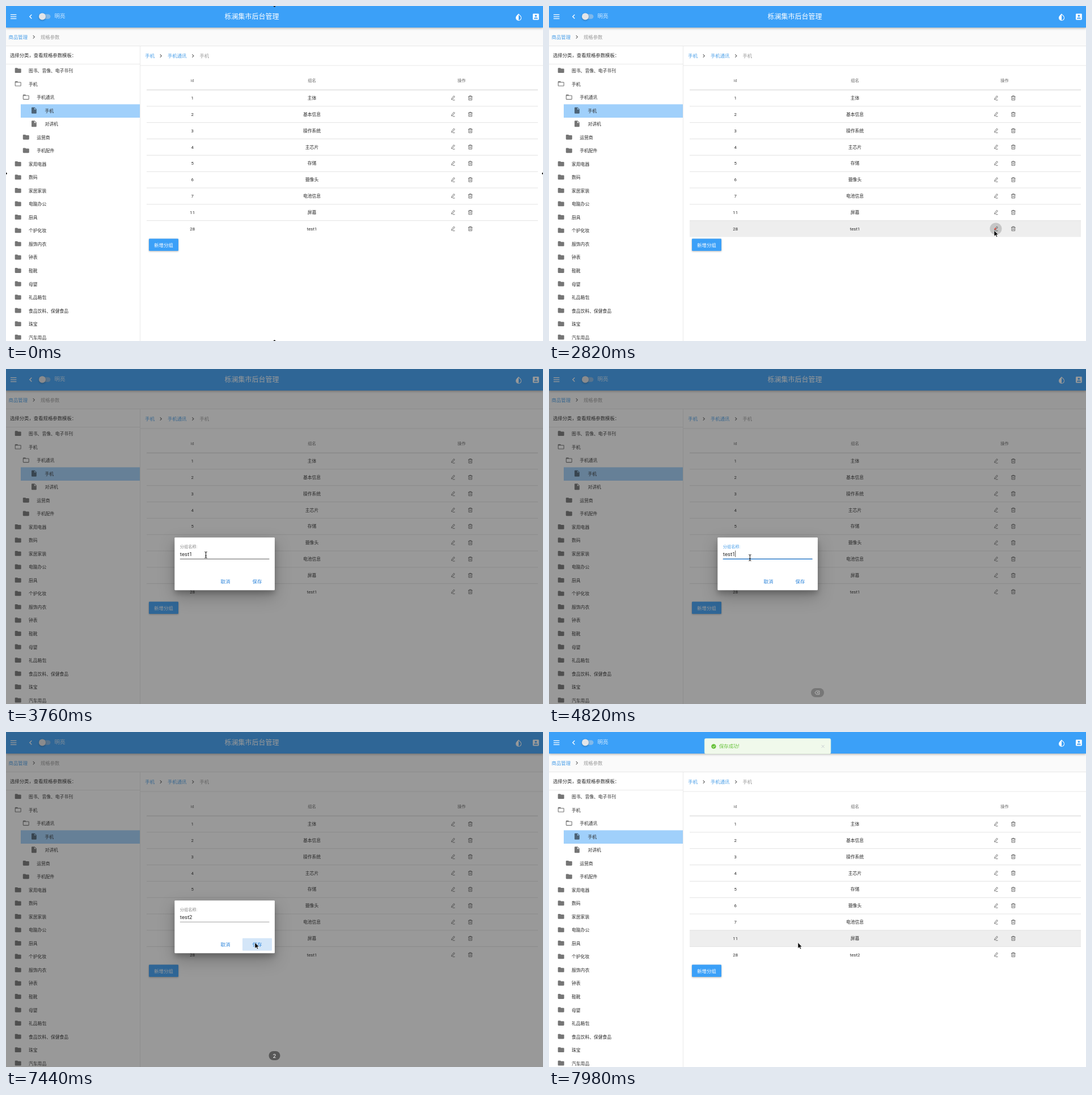
Recreate the animation shown at these times as an HTML page. Size 947 by 591 pixels, loop 8 s.

```html
<!DOCTYPE html>
<html lang="zh-CN">
<head>
<meta charset="utf-8">
<style>
html, body { margin: 0; width: 100%; height: 100%; overflow: hidden; background: #fff; }
svg { display: block; width: 100%; height: 100%; font-family: Roboto, 'Noto Sans CJK SC', 'Noto Sans CJK', sans-serif; }
.raised { filter: drop-shadow(0 1px 1.5px rgba(0,0,0,.3)); }
#panel { filter: drop-shadow(0 6px 5px rgba(0,0,0,.2)) drop-shadow(0 10px 14px rgba(0,0,0,.24)); }
</style>
</head>
<body>
<svg id="stage" viewBox="0 0 947 591"></svg>
<script>
const LOOP = 8000;
const BLUE = '#3ba0f8', LINK = '#4a9fe8', INK = '#2b2b2b', GREY = '#757575', ACTION = '#2a83da';
const ROW_H = 28.83, TABLE_TOP = 148;

// --- markup helpers; text is placed by its vertical centre ---
const text = (s, x, y, size = 7.8, fill = INK, extra = '') =>
  `<text x="${x}" y="${y + size * 0.37}" font-size="${size}" fill="${fill}" ${extra}>${s}</text>`;
const mid = (s, x, y, size, fill, extra = '') => text(s, x, y, size, fill, `text-anchor="middle" ${extra}`);
const rect = (x, y, w, h, fill, extra = '') =>
  `<rect x="${x}" y="${y}" width="${w}" height="${h}" fill="${fill}" ${extra}/>`;
const circle = (x, y, r, fill, extra = '') => `<circle cx="${x}" cy="${y}" r="${r}" fill="${fill}" ${extra}/>`;
const line = (d, stroke, width = 1, extra = '') =>
  `<path d="${d}" fill="none" stroke="${stroke}" stroke-width="${width}" ${extra}/>`;
const icon = (d, cx, cy, fill, scale = 0.55) =>
  `<path d="${d}" fill="${fill}" fill-rule="evenodd" transform="translate(${cx} ${cy}) scale(${scale}) translate(-12 -12)"/>`;
const chevron = (x, y) => line(`M${x - 1.3} ${y - 2.7}l2.7 2.7l-2.7 2.7`, '#666', 1.1);

const FOLDER = 'M10 4H4Q2 4 2 6V18Q2 20 4 20H20Q22 20 22 18V8Q22 6 20 6H12Z';
const ICONS = {
  folder: FOLDER,
  open: FOLDER + 'M4 8H20V18H4Z',
  file: 'M6 2Q4 2 4 4V20Q4 22 6 22H18Q20 22 20 20V8L14 2ZM13 9V3.5L18.5 9Z'
};

const tree = [
  [0, '图书、音像、电子书刊'], [0, '手机', 'open'], [1, '手机通讯', 'open'],
  [2, '手机', 'file'], [2, '对讲机', 'file'], [1, '运营商'], [1, '手机配件'],
  ...['家用电器', '数码', '家居家装', '电脑办公', '厨具', '个护化妆', '服饰内衣', '钟表', '鞋靴',
    '母婴', '礼品箱包', '食品饮料、保健食品', '珠宝', '汽车用品'].map(name => [0, name])
];
const groups = [[1, '主体'], [2, '基本信息'], [3, '操作系统'], [4, '主芯片'], [5, '存储'],
  [6, '摄像头'], [7, '电池信息'], [11, '屏幕'], [28, 'test1']];

const header = () => `<g>
  ${rect(0, 0, 947, 38, BLUE, 'style="filter:drop-shadow(0 1.5px 2px rgba(0,0,0,.35))"')}
  ${line('M8 15.3h10.4M8 18.8h10.4M8 22.3h10.4', '#fff', 1.2)}
  ${line('M45.3 15.3l-3.5 3.5l3.5 3.5', '#fff', 1.3)}
  ${rect(58.5, 14.4, 20, 8.4, '#82b9ea', 'rx="4.2"')}
  ${circle(64, 18.6, 6, '#e3e5e8', 'class="raised"')}
  ${text('明亮', 85.5, 18, 9.4, '#fff', 'opacity=".78"')}
  ${mid('栎澜集市后台管理', 433.5, 19, 12, '#fff', 'font-weight="500"')}
  ${line('M904 14.4l3.2 3.3a4.5 4.5 0 1 1-6.4 0z', '#fff', 1.1)}
  <path d="M904 14l-3.3 3.5a4.6 4.6 0 0 0 3.3 7.4z" fill="#fff"/>
  ${rect(929, 13.6, 10.8, 10.8, '#fff', 'rx="1.3"')}
  ${circle(934.4, 17.2, 1.8, BLUE)}
  <path d="M930.8 22.6q0-2.4 3.6-2.4t3.6 2.4z" fill="${BLUE}"/>
</g>`;

const treeItem = ([level, name, kind = 'folder'], i) => {
  const y = 114 + i * 23.52, selected = i === 3;
  return (selected ? rect(26, 173.4, 210, 23.6, '#a0d0fb') : '')
    + icon(ICONS[kind], 21.2 + level * 14.1, y - 0.3, selected ? '#4c6478' : GREY)
    + text(name, 40 + level * 14.2, y + 0.3);
};

const groupRow = ([id, name], i) => {
  const top = TABLE_TOP + i * ROW_H, y = top + 14.2;
  return rect(248, top, 690, ROW_H, '#eee', `id="row${id}" opacity="0"`)
    + (i ? line(`M248 ${top}H938`, '#dcdcdc', 0.8) : '')
    + mid(id, 328.7, y, 7.8) + mid(name, 539.5, y, 7.8, INK, `id="name${id}"`)
    + line(`M785.6 ${y + 3}l.5-2.3l3.6-4.4l1.6 1.3l-3.6 4.4zM787.6 ${y + 3.8}h4`, '#555', 0.8)
    + line(`M815 ${y - 2.4}h7.6M817.2 ${y - 2.4}v-1.3h3.2v1.3M816 ${y - 2.4}v6.2h5.6v-6.2M817.9 ${y - .5}v2.7M819.7 ${y - .5}v2.7`, '#555', 0.8);
};

const page = () => `
  ${rect(0, 0, 947, 591, '#fff')}
  ${rect(0, 38, 947, 32.5, '#fafafa')}
  ${line('M0 70.5H947M0 102.5H236M236.5 71V591M237 105H947', '#e4e4e4', 0.8)}
  ${header()}
  ${text('商品管理', 4.6, 54.4, 8.4, LINK)}${chevron(49, 54.6)}${text('规格参数', 61, 54.4, 8.4, '#9a9a9a')}
  ${text('选择分类，查看规格参数模板：', 7, 86.5, 8.4)}
  ${tree.map(treeItem).join('')}
  ${text('手机', 245.3, 87.8, 8.4, LINK)}${chevron(273, 88)}
  ${text('手机通讯', 285, 87.8, 8.4, LINK)}${chevron(329.6, 88)}
  ${text('手机', 341.5, 87.8, 8.4, '#9a9a9a')}
  ${mid('id', 328.7, 131, 7.2, '#666')}${mid('组名', 539.5, 131, 7.2, '#666')}${mid('操作', 803.5, 131, 7.2, '#666')}
  ${groups.map(groupRow).join('')}
  ${line('M248 148H938', '#d0d0d0', 1)}
  ${circle(788, 393, 10.6, '#000', 'id="hoverDisc" opacity="0"')}
  ${rect(252, 410.4, 52, 21.6, BLUE, 'rx="1.3" class="raised"')}
  ${mid('新增分组', 278, 421.4, 8.4, '#fff', 'font-weight="500"')}
  ${circle(0, 0, 0, '#f44336', 'id="click"')}`;

const dialog = () => `<g id="dialog">
  ${rect(297.3, 297.3, 176.6, 93, '#fff', 'rx="1.3" id="panel"')}
  ${text('分组名称:', 306.8, 313.3, 7.2, '#8a8a8a', 'id="label"')}
  ${text('test1', 306.8, 326.3, 9.6, INK, 'id="field"')}
  ${line('M306.8 335.2H464.4', '#444', 0.8, 'id="baseline"')}
  ${rect(306.8, 334.7, 157.6, 1.3, ACTION, 'id="focusLine"')}
  ${rect(328.4, 320.3, 0.8, 11.5, '#333', 'id="caret"')}
  ${rect(417, 363.8, 52, 22, ACTION, 'rx="1.3" id="saveTint"')}
  ${mid('取消', 387, 374.6, 8.4, ACTION, 'font-weight="500"')}
  ${mid('保存', 443, 374.6, 8.4, ACTION, 'font-weight="500"')}
</g>`;

const toast = () => `<g id="toast">
  ${rect(274.3, 11.5, 222.6, 27, '#f0f9eb', 'rx="2.4" stroke="#e1f3d8" stroke-width=".6"')}
  ${circle(290.4, 25.4, 4.2, '#67c23a')}
  ${line('M288.4 25.5l1.5 1.5l2.7-2.9', '#fff', 0.9)}
  ${text('保存成功!', 300, 25.3, 8.4, '#67c23a')}
  ${line('M480.6 22.9l5 5m0-5l-5 5', '#c0c4cc', 0.8)}
</g>`;

const keys = () => `
  <g id="keyBack">${rect(462, 563, 23, 16, '#575757', 'rx="8"')}
    ${line('M469 571l2.4-3h5.4v6h-5.4zM472.5 569.7l2.6 2.6m0-2.6l-2.6 2.6', '#fff', 0.8)}</g>
  <g id="keyTwo">${rect(463.5, 563, 20, 16, '#575757', 'rx="8"')}${mid('2', 473.5, 571, 9.6, '#fff')}</g>`;

const pointers = () => `
  <path id="arrow" d="M0 0V10.2L2.4 8L4 11.6L5.7 10.8L4.1 7.4H7.2Z" fill="#000" stroke="#fff" stroke-width=".6"/>
  ${line('M-2-5.5Q0-5.5 0-4Q0-5.5 2-5.5M0-4.5V4.5M-2 5.5Q0 5.5 0 4Q0 5.5 2 5.5M-1.2 1.6H1.2', '#111', 1, 'id="beam"')}`;

const handles = () => '<g id="handles">'
  + [[0, 295.5], [947, 295.5], [473.5, 0], [473.5, 591]].map(([x, y]) => circle(x, y, 1.8, '#111')).join('') + '</g>';

document.getElementById('stage').innerHTML = page()
  + rect(0, 0, 947, 591, '#212121', 'id="overlay"')
  + dialog() + toast() + keys() + pointers() + handles();

const el = {};
document.querySelectorAll('[id]').forEach(node => { el[node.id] = node; });

// --- timing helpers ---
const ramp = (t, start, length) => Math.min(1, Math.max(0, (t - start) / length));
const smooth = p => (1 - Math.cos(Math.PI * p)) / 2;
const bezier = (x1, y1, x2, y2) => x => {
  const at = (a, b, s) => 3 * a * s * (1 - s) ** 2 + 3 * b * s * s * (1 - s) + s ** 3;
  let low = 0, high = 1;
  for (let i = 0; i < 20; i++) {
    const s = (low + high) / 2;
    if (at(x1, x2, s) < x) low = s; else high = s;
  }
  return at(y1, y2, high);
};
const ease = bezier(0.25, 0.1, 0.25, 1);
const swift = bezier(0.25, 0.8, 0.25, 1);

const set = (node, attrs) => { for (const name in attrs) node.setAttribute(name, attrs[name]); };
const fade = (node, opacity) => node.setAttribute('opacity', opacity);
const show = (node, visible) => { node.style.display = visible ? '' : 'none'; };

// start, end, from, to
const moves = [
  [500, 1300, [513, 541], [780, 394.3]],
  [1340, 1400, [780, 394.3], [784.6, 394]],
  [2480, 2560, [784.6, 394], [785, 396]],
  [3300, 3740, [785, 396], [352.5, 328]],
  [3880, 4080, [352.5, 328], [354.4, 333]],
  [5980, 6780, [354.4, 333], [439, 371.5]]
];

function pointerAt(t) {
  const [start, end, from, to] = moves.filter(move => t >= move[0]).pop() || moves[0];
  const p = smooth(ramp(t, start, end - start));
  return from.map((v, i) => v + (to[i] - v) * p);
}

function drawPointer(t) {
  const [x, y] = pointerAt(t);
  const inField = t > 3300 && t < 7100 && x < 465 && y > 316 && y < 341;
  show(el.arrow, t >= 500 && !inField);
  show(el.beam, inField);
  set(inField ? el.beam : el.arrow, { transform: `translate(${x} ${y})` });

  const second = t >= 2780;
  const p = ramp(t, second ? 2780 : 1640, 740);
  set(el.click, { cx: second ? 787 : 785, cy: second ? 393 : 394, r: 14 * (1 - (1 - p) ** 2), opacity: 1 - p });
}

function drawDialog(t) {
  const open = swift(ramp(t, 2850, 300)) - swift(ramp(t, 7740, 250));
  const scale = 0.5 + 0.5 * open;
  show(el.dialog, open > 0.001);
  fade(el.dialog, open);
  set(el.dialog, { transform: `translate(385.6 343.8) scale(${scale}) translate(-385.6 -343.8)` });
  fade(el.overlay, 0.46 * (ease(ramp(t, 2860, 340)) - ease(ramp(t, 7690, 310))));

  const focused = t >= 4120 && t < 7100;
  const width = 157.6 * (ease(ramp(t, 4120, 300)) - ramp(t, 7100, 100));
  set(el.focusLine, { x: 385.6 - width / 2, width });
  set(el.label, { fill: focused ? LINK : '#8a8a8a' });
  set(el.baseline, { stroke: t > 3300 && t < 7100 ? '#333' : '#8a8a8a' });
  el.field.textContent = t < 4860 ? 'test1' : t < 5660 ? 'test' : 'test2';

  const blinkedOff = (t >= 5380 && t < 5620) || (t >= 6220 && t < 6720);
  show(el.caret, focused && !blinkedOff);
  set(el.caret, { x: t >= 4860 && t < 5660 ? 322.9 : 328.4 });
  fade(el.saveTint, 0.2 * ramp(t, 7100, 100));
}

function render(t) {
  show(el.handles, t < 80);
  fade(el.row28, ramp(t, 2480, 200) - ramp(t, 2940, 260));
  fade(el.row11, ramp(t, 7800, 160));
  fade(el.hoverDisc, 0.17 * (ramp(t, 2480, 200) - ramp(t, 2940, 280)));
  el.name28.textContent = t < 7700 ? 'test1' : 'test2';

  drawDialog(t);

  fade(el.toast, ramp(t, 7690, 130));
  set(el.toast, { transform: `translate(0 ${-27.5 * (1 - ramp(t, 7740, 220))})` });

  show(el.keyBack, t >= 4820 && t < 6800);
  fade(el.keyBack, 0.5 + 0.5 * ramp(t, 4820, 60));
  set(el.keyBack, { transform: `translate(0 ${t < 5620 ? 0 : -20.3})` });
  show(el.keyTwo, t >= 5620 && t < 7600);
  fade(el.keyTwo, 0.5 + 0.5 * ramp(t, 5620, 60));

  drawPointer(t);
}

const began = performance.now();
function tick() {
  render((performance.now() - began) % LOOP);
  requestAnimationFrame(tick);
}
tick();
</script>
</body>
</html>
```
